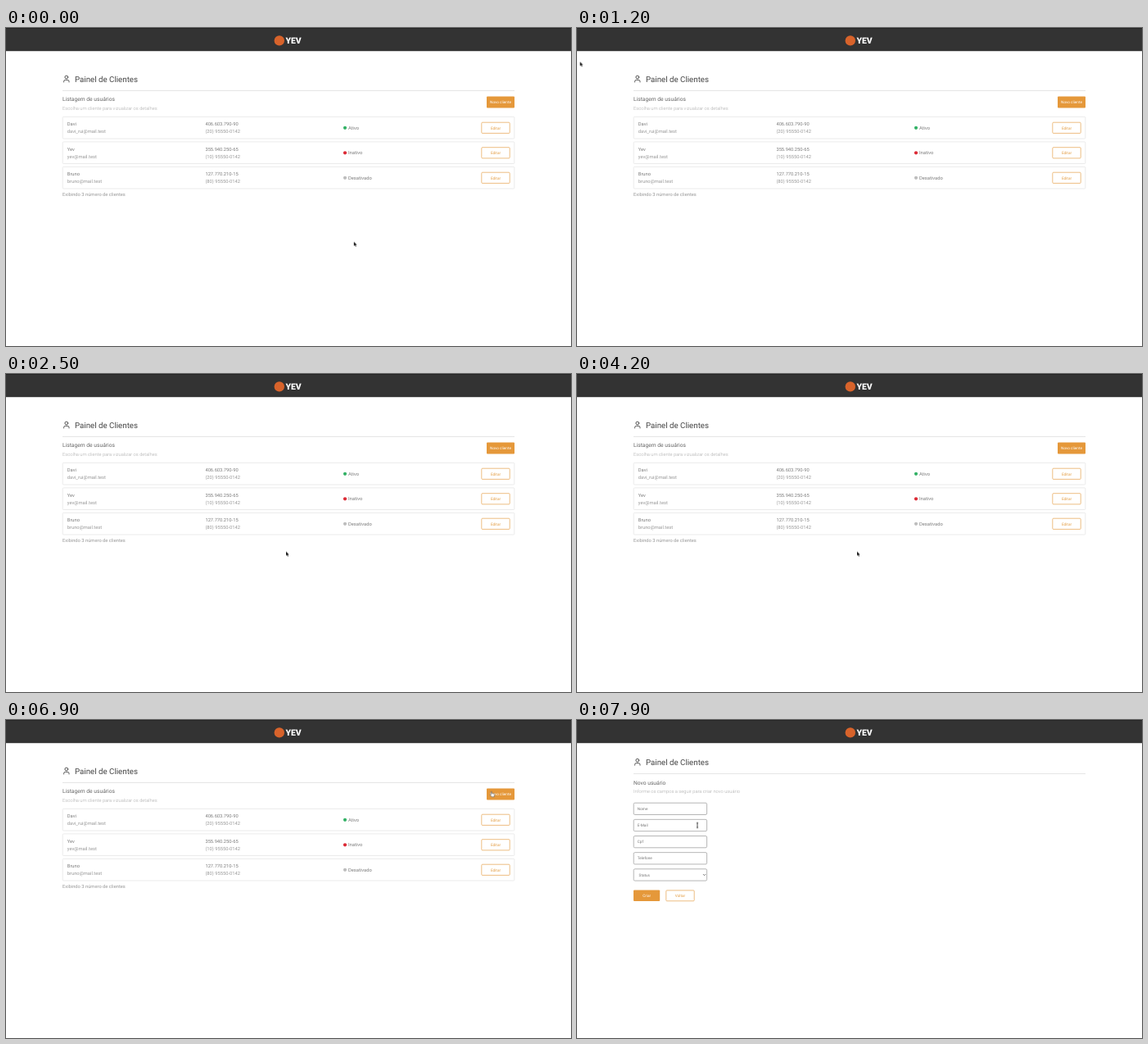
Recreate the animation shown at these times as an HTML page. Size 690 by 388 pixels, loop 8 s.

```html
<!DOCTYPE html>
<html lang="pt-BR">
<head>
<meta charset="utf-8">
<title>Painel de Clientes</title>
<style>
  html, body { margin: 0; width: 100%; height: 100%; overflow: hidden; background: #fff; }
  svg { display: block; width: 100%; height: 100%; }
  text { font-family: Roboto, sans-serif; font-size: 5.78px; fill: #7d7d7d; text-rendering: geometricPrecision; }

  .title { font-size: 9.72px; fill: #444; }
  .heading { font-size: 6.7px; fill: #666; }
  .hint { font-weight: 300; fill: #a8a8a8; }
  .soft { fill: #999; }
  .brand { font-size: 10.4px; font-weight: 900; fill: #fff; }
  .label { font-size: 4.7px; text-anchor: middle; fill: #e29a3e; }
  .label.on { fill: #fff; }
  .field text { font-size: 4.7px; fill: #777; }

  .rule { stroke: #dcdcdc; stroke-width: .8; }
  .card { fill: #fff; stroke: #e6e6e6; stroke-width: .8; }
  .solid { fill: #e5983a; }
  .outline { fill: #fff; stroke: #e9ad62; stroke-width: .8; }
  .input { fill: #fff; stroke: #979797; stroke-width: .7; }
  .icon { fill: none; stroke: #444; stroke-width: .9; stroke-linecap: round; }

  /* The small negative delay keeps every step clear of its 100 ms boundary. */
  .timed { animation: 8s step-end -10ms infinite; }
  .list { animation-name: list; }
  .form { animation-name: form; }
  .pointer { animation-name: move; }
  .arrow { animation-name: arrow; }
  .hand { animation-name: hand; }
  .beam { animation-name: beam; }

  @keyframes list { 0% { visibility: visible } 90%, 100% { visibility: hidden } }
  @keyframes form { 0% { visibility: hidden } 90%, 100% { visibility: visible } }
  @keyframes arrow {
    0% { visibility: visible } 85% { visibility: hidden }
    90% { visibility: visible } 96.25%, 100% { visibility: hidden }
  }
  @keyframes hand {
    0% { visibility: hidden } 85% { visibility: visible } 90%, 100% { visibility: hidden }
  }
  @keyframes beam { 0% { visibility: hidden } 96.25%, 100% { visibility: visible } }

  @keyframes move {
    0% { transform: translate(424.8px, 260.8px) }
    1.25% { transform: translate(424.8px, 260.8px); animation-timing-function: steps(3, start) }
    5% { transform: translate(144px, 119px); animation-timing-function: steps(4, start) }
    10% { transform: translate(0, 39px) }
    15% { transform: translate(3.6px, 41.2px) }
    16.25% { transform: translate(3.6px, 41.2px); animation-timing-function: steps(3, start) }
    20% { transform: translate(75px, 124.5px) }
    21.25% { transform: translate(75px, 124.5px); animation-timing-function: steps(4, start) }
    26.25% { transform: translate(418.8px, 260.2px); animation-timing-function: steps(5, start) }
    32.5% { transform: translate(342px, 216.6px) }
    76.25% { transform: translate(342px, 216.6px); animation-timing-function: steps(8, start) }
    86.25% { transform: translate(592.8px, 87.3px) }
    92.5% { transform: translate(592.8px, 87.3px); animation-timing-function: steps(4, start) }
    97.5% { transform: translate(112px, 153px); animation-timing-function: steps(2, start) }
    100% { transform: translate(147px, 128.4px) }
  }
</style>
</head>
<body>
<svg viewBox="0 0 690 388">
  <defs>
    <g id="heading">
      <circle class="icon" cx="73.8" cy="60" r="1.9"/>
      <path class="icon" d="M70.6 66V65.3Q70.6 63.4 72.5 63.4H75.1Q77 63.4 77 65.3V66"/>
      <text class="title" x="84" y="66.2">Painel de Clientes</text>
      <path class="rule" d="M69 76.4H621"/>
    </g>
    <g id="row">
      <rect class="card" x="69.2" y="108.4" width="551.6" height="26.6" rx="1"/>
      <rect class="outline" x="580.8" y="115.2" width="34.4" height="13.2" rx="1"/>
      <text class="label" x="598" y="123.5">Editar</text>
    </g>
    <rect id="input" class="input" x="69.2" y="101.2" width="89.4" height="14.3" rx="1.5"/>
  </defs>

  <rect width="690" height="28.2" fill="#333"/>
  <rect width="690" height="1" fill="#242424"/>
  <circle cx="333.8" cy="15.4" r="6.2" fill="#d8632b"/>
  <text class="brand" x="341.4" y="19.1">YEV</text>

  <g class="timed list">
    <use href="#heading"/>
    <text class="heading" x="69" y="89.4">Listagem de usuários</text>
    <text class="hint" x="69" y="99.7">Escolha um cliente para vizualizar os detalhes</text>
    <rect class="solid" x="587" y="83.4" width="34" height="14.1" rx="1"/>
    <text class="label on" x="604" y="92.2">Novo cliente</text>

    <g>
      <use href="#row"/>
      <text x="74.8" y="119.4">Davi</text>
      <text class="soft" x="74.8" y="128">davi_rui@mail.test</text>
      <text x="243.4" y="119.4">406.603.790-90</text>
      <text class="soft" x="243.4" y="128">(20) 95550-0142</text>
      <circle cx="414" cy="121.8" r="2.1" fill="#32b165"/>
      <text x="418" y="123.8">Ativo</text>
    </g>
    <g transform="translate(0 30.5)">
      <use href="#row"/>
      <text x="74.8" y="119.4">Yev</text>
      <text class="soft" x="74.8" y="128">yev@mail.test</text>
      <text x="243.4" y="119.4">355.940.250-65</text>
      <text class="soft" x="243.4" y="128">(10) 95550-0142</text>
      <circle cx="414" cy="121.8" r="2.1" fill="#dc2a35"/>
      <text x="418" y="123.8">Inativo</text>
    </g>
    <g transform="translate(0 61)">
      <use href="#row"/>
      <text x="74.8" y="119.4">Bruno</text>
      <text class="soft" x="74.8" y="128">bruno@mail.test</text>
      <text x="243.4" y="119.4">127.770.210-15</text>
      <text class="soft" x="243.4" y="128">(80) 95550-0142</text>
      <circle cx="414" cy="121.8" r="2.1" fill="#bdbdbd"/>
      <text x="418" y="123.8">Desativado</text>
    </g>
    <text class="soft" x="69" y="205.2">Exibindo 3 número de clientes</text>
  </g>

  <g class="timed form">
    <use href="#heading" y="-10.8"/>
    <text class="heading" x="69" y="78.8">Novo usuário</text>
    <text class="hint" x="69" y="88.9">Informe os campos a seguir para criar novo usuário</text>
    <g class="field">
      <use href="#input"/>
      <use href="#input" y="20.15"/>
      <use href="#input" y="40.3"/>
      <use href="#input" y="60.45"/>
      <use href="#input" y="80.6"/>
      <text x="73.8" y="110">Nome</text>
      <text x="73.8" y="130.1">E-Mail</text>
      <text x="73.8" y="150.3">Cpf</text>
      <text x="73.8" y="170.4">Telefone</text>
      <text x="75.6" y="190.6">Status</text>
      <path class="icon" d="M154.2 188.3L155.6 189.7L157 188.3" style="stroke-width:.7"/>
    </g>
    <rect class="solid" x="69" y="207.6" width="32.2" height="13.5" rx="1"/>
    <text class="label on" x="85.1" y="216">Criar</text>
    <rect class="outline" x="108.8" y="207.9" width="34.4" height="12.9" rx="1"/>
    <text class="label" x="126" y="216">Voltar</text>
  </g>

  <g class="timed pointer">
    <path class="timed arrow" d="M0 0V5L1.2 4L2 5.9L2.9 5.5L2.1 3.7H3.7Z"
          fill="#151515" stroke="#fff" stroke-width=".4" paint-order="stroke"/>
    <path class="timed hand" d="M-.6 .3Q0-.4 .6 .3V2.3L3.4 2.8Q4 3 3.9 3.8L3.3 6.4H.2L-1.6 4.1Q-1.6 3.3-.6 3.9Z"
          fill="#fff" stroke="#333" stroke-width=".5"/>
    <path class="timed beam" d="M-1.1-2.9H1.1M0-2.9V2.9M-1.1 2.9H1.1"
          fill="none" stroke="#222" stroke-width=".8"/>
  </g>
</svg>
</body>
</html>
```
